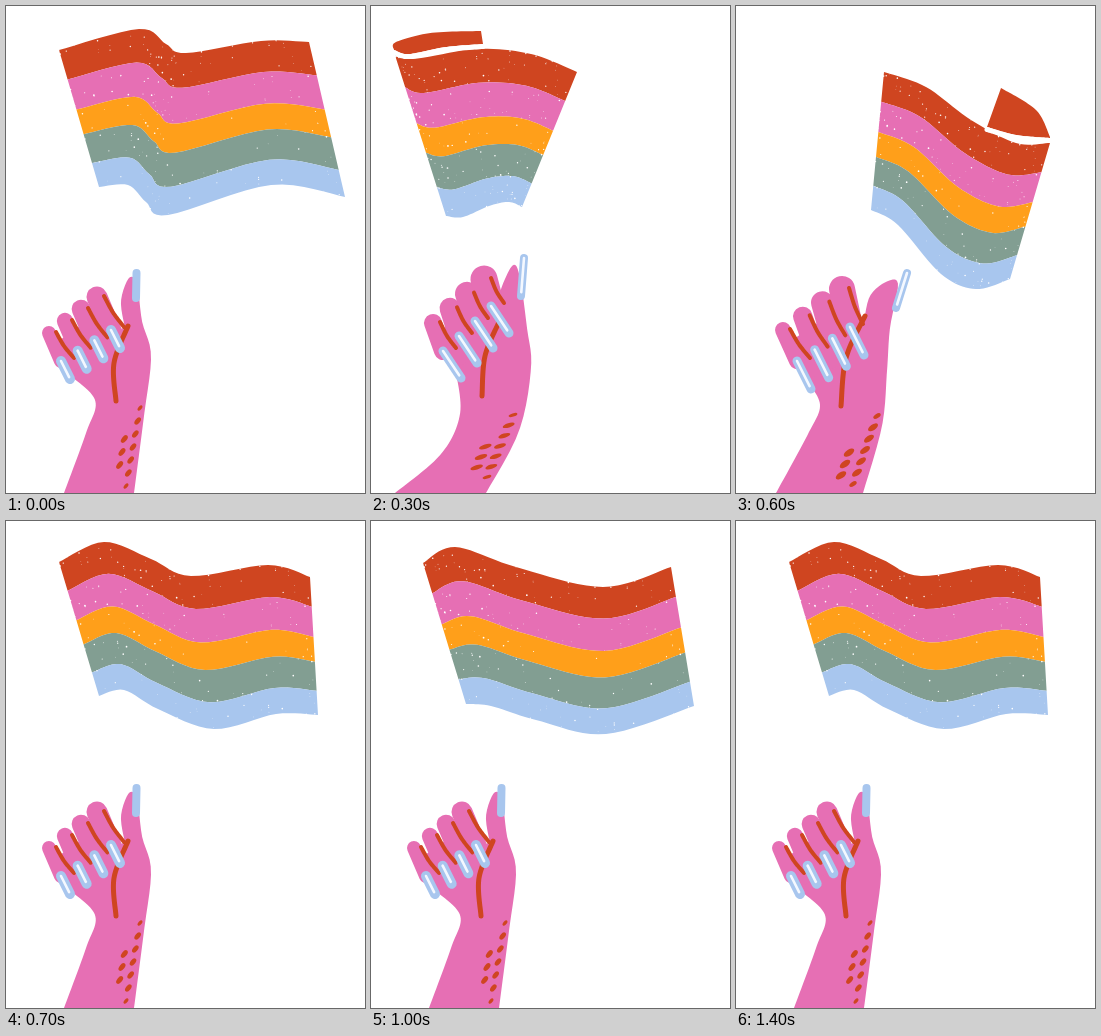
These frames come from a looping animation (359 px wide and 487 px high, 1500 ms). An HTML page with a canvas:

```html
<!DOCTYPE html>
<html lang="en">
<head>
<meta charset="utf-8">
<title>Waving flag</title>
<style>
html, body { margin: 0; width: 100%; height: 100%; overflow: hidden; background: #fff; }
canvas { display: block; width: 359px; height: 487px; }
</style>
</head>
<body>
<canvas id="stage" width="359" height="487"></canvas>
<script>
const ctx = document.getElementById('stage').getContext('2d');
const RED = '#cf4520', PINK = '#e66fb4', BLUE = '#a8c6ee';
const BANDS = [RED, PINK, '#ff9f1a', '#829e92', BLUE];
const BAND_EDGES = [0, 0.215, 0.435, 0.615, 0.825, 1];
const STEPS = 40;

// Catmull-Rom spline through flat x,y pairs, sampled evenly by parameter.
function spline(...flat) {
  const n = flat.length / 2;
  const at = (i, axis) => flat[2 * Math.max(0, Math.min(n - 1, i)) + axis];
  return Array.from({ length: STEPS + 1 }, (_, s) => {
    const pos = s / STEPS * (n - 1), i = Math.min(n - 2, Math.floor(pos)), t = pos - i;
    return [0, 1].map(axis => {
      const [a, b, c, d] = [-1, 0, 1, 2].map(k => at(i + k, axis));
      return b + t / 2 * (c - a + t * (2 * a - 5 * b + 4 * c - d + t * (3 * (b - c) + d - a)));
    });
  });
}

// Blends numbers, and arrays or objects of them.
function mix(a, b, k) {
  if (typeof a === 'number') return a + (b - a) * k;
  if (Array.isArray(a)) return a.map((v, i) => mix(v, b[i], k));
  return Object.fromEntries(Object.keys(a).map(key => [key, mix(a[key], b[key], k)]));
}

const add = ([x, y], [dx, dy], k = 1) => [x + dx * k, y + dy * k];

// A flag is its top and bottom edge; the bands divide the cloth between them.
const flags = {
  crest: {
    top: spline(53,44, 133,23, 160,38, 180,47, 255,35, 303,36),
    bottom: spline(93,181, 122,179, 140,196, 162,209, 265,179, 339,191)
  },
  ripple: {
    top: spline(53,41, 98,21, 145,38, 185,55, 262,44, 304,56),
    bottom: spline(93,175, 118,169, 152,188, 208,208, 270,193, 312,194)
  },
  swell: {
    top: spline(52,42, 84,26, 145,46, 232,66, 300,46),
    bottom: spline(95,183, 120,185, 165,199, 235,213, 323,185)
  },
  left: {
    top: spline(23,46, 42,53, 105,43, 160,48, 206,66),
    bottom: spline(75,210, 92,211, 118,200, 138,196, 151,201)
  },
  right: {
    top: spline(148,66, 190,81, 235,114, 280,137, 314,137),
    bottom: spline(135,204, 162,219, 205,268, 240,283, 274,273)
  }
};

// The rolled-over corner: outer rim, and the rim beside the white gap.
const folds = {
  left: { outer: spline(23,44, 25,36, 60,27, 110,25), inner: spline(112,38, 75,41, 38,48, 23,44) },
  right: { outer: spline(265,82, 300,104, 314,131), inner: spline(314,132, 280,129, 251,121) }
};

// Fingers are spaced evenly from pinky to index, so only those two are placed.
const hands = {
  rest: {
    wrist: [58,487, 80,427, 89,394],
    thumb: [119,322, 115,295, 123,272, 131,278, 136,315, 145,350, 138,410, 128,487],
    tips: [[43,327], [91,291]], widths: [14, 21],
    nails: [[55,355], [105,324]], nail: [9, 18], nailWidth: 10, thumbNail: [[130.5,267], [130,292]],
    palm: [122,320, 108,357, 110,395],
    marks: [[134,402], [120,480]], side: [-11, 5], mark: [9, 5, -0.9], thumbShine: 0
  },
  left: {
    wrist: [24,487, 70,448, 89,408],
    thumb: [128,300, 130,283, 142,259, 149,272, 156,322, 160,362, 148,425, 115,487],
    tips: [[62,317], [113,273]], widths: [18, 27],
    nails: [[72,345], [120,300]], nail: [18, 27], nailWidth: 9, thumbNail: [[153,252], [150,290]],
    palm: [128,316, 114,350, 111,390],
    marks: [[142,409], [116,471]], side: [-19, 11], mark: [13, 4.5, -0.3], thumbShine: 1
  },
  right: {
    wrist: [40,487, 72,428, 84,399],
    thumb: [128,315, 134,290, 150,276, 162,278, 154,322, 151,365, 146,420, 127,487],
    tips: [[47,324], [106,283]], widths: [16, 26],
    nails: [[61,355], [114,321]], nail: [14, 28], nailWidth: 9, thumbNail: [[171,267], [160,302]],
    palm: [129,310, 110,352, 105,400],
    marks: [[141,410], [117,478]], side: [-20, 14], mark: [12, 6, -0.6], thumbShine: 1
  }
};

let seed = 11;
const random = () => (seed = seed * 16807 % 2147483647) / 2147483647;
const specks = Array.from({ length: 190 }, () => ({
  col: Math.floor(random() * STEPS), v: random() ** 1.3, r: 0.3 + 0.6 * random() ** 2
}));

function trace(points) {
  ctx.beginPath();
  points.forEach(p => ctx.lineTo(...p));
}

function fillPath(points, color) {
  ctx.fillStyle = color;
  trace(points);
  ctx.fill();
}

function stroke(points, color, width) {
  ctx.strokeStyle = color;
  ctx.lineWidth = width;
  trace(points);
  ctx.stroke();
}

function drawFlag({ top, bottom }) {
  const edges = BAND_EDGES.map(v => mix(top, bottom, v));
  BANDS.forEach((color, i) => fillPath([...edges[i], ...edges[i + 1].slice().reverse()], color));
  ctx.fillStyle = '#fff';
  for (const { col, v, r } of specks) {
    ctx.beginPath();
    ctx.arc(...mix(top[col], bottom[col], v), r, 0, 7);
    ctx.fill();
  }
}

// The fold grows out of the cloth corner it is attached to.
function drawFold({ outer, inner }, pivot, anchor, size) {
  const place = ([x, y]) => [anchor[0] + (x - pivot[0]) * size, anchor[1] + (y - pivot[1]) * size];
  const rim = inner.map(place);
  fillPath([...outer.map(place), ...rim], RED);
  stroke(rim.map(p => add(p, [0, 2.5 * size])), '#fff', 5 * size);
}

function drawNail(ends, width, shine) {
  stroke(ends, BLUE, width);
  if (shine) stroke([ends[0], mix(...ends, 0.9)], '#f4f8ff', 2.6 * shine);
}

function drawMarks({ marks, side, mark: [length, width, tilt] }) {
  ctx.fillStyle = RED;
  const dot = ([x, y], size) => {
    ctx.beginPath();
    ctx.ellipse(x, y, length / 2 * size, width / 2 * size, tilt, 0, 7);
    ctx.fill();
  };
  for (let i = 0; i < 7; i++) {
    const p = mix(...marks, i / 6), inside = i > 1 && i < 5;
    dot(p, i % 6 ? 0.95 : 0.7);
    if (inside) dot(add(p, side), 1);
  }
}

function drawHand(hand) {
  const fingers = [0, 1, 2, 3].map(i => {
    const nail = mix(...hand.nails, i / 3);
    return {
      tip: mix(...hand.tips, i / 3), nail, nailEnd: add(nail, hand.nail),
      width: mix(...hand.widths, i / 3)
    };
  });
  const [pinky, , , index] = fingers;

  const heel = mix(pinky.nail, pinky.nailEnd, 0.7);
  fillPath([...spline(...hand.wrist, ...heel), index.nail, ...spline(...hand.thumb)], PINK);
  fillPath([mix(pinky.tip, pinky.nail, 0.4), mix(index.tip, index.nail, 0.4), index.nailEnd, heel], PINK);
  fingers.forEach(f => stroke([f.tip, f.nail], PINK, f.width));

  for (const { tip, nail } of fingers) {
    const from = add(tip, [7, -1]), to = add(nail, [13, -3]);
    const [x, y] = add(mix(from, to, 0.5), [-1, 1]);
    stroke(spline(...from, x, y, ...to), RED, 4);
  }
  stroke(spline(...hand.palm), RED, 5);
  fingers.forEach(f => drawNail([f.nail, f.nailEnd], hand.nailWidth, 1));
  drawNail(hand.thumbNail, 8, hand.thumbShine);
  drawMarks(hand);
}

const blend = (from, to, k) => ({
  flag: mix(flags[from.flag], flags[to.flag], k), hand: mix(hands[from.hand], hands[to.hand], k)
});
const REST = { flag: 'crest', hand: 'rest' };
const LEFT = { flag: 'left', hand: 'left' };
const RIGHT = { flag: 'right', hand: 'right' };

// Swing left, swing right, then wave in place.
function sceneAt(step) {
  if (step < 3) return { ...blend(REST, LEFT, step / 3), leftFold: step / 3 };
  if (step <= 6) {
    const k = (step - 3) / 3, lift = [0, -30 * Math.sin(Math.PI * k)];
    const scene = blend(LEFT, RIGHT, k);
    for (const side of ['top', 'bottom']) scene.flag[side] = scene.flag[side].map(p => add(p, lift));
    return { ...scene, leftFold: Math.max(0, 1 - 2 * k), rightFold: Math.max(0, 2 * k - 1) };
  }
  const wave = step < 13 ? ['swell', 'ripple'][step % 2] : ['ripple', 'crest'][step % 2];
  return { flag: flags[wave], hand: hands.rest };
}

function draw(now) {
  const { flag, hand, leftFold, rightFold } = sceneAt(Math.floor(now % 1500 / 100));
  ctx.fillStyle = '#fff';
  ctx.fillRect(0, 0, 359, 487);
  ctx.lineCap = ctx.lineJoin = 'round';
  drawFlag(flag);
  if (leftFold) drawFold(folds.left, flags.left.top[0], flag.top[0], leftFold);
  if (rightFold) drawFold(folds.right, flags.right.top[STEPS], flag.top[STEPS], rightFold);
  drawHand(hand);
}

const start = performance.now();
function tick() {
  draw(performance.now() - start);
  requestAnimationFrame(tick);
}
tick();
</script>
</body>
</html>
```
